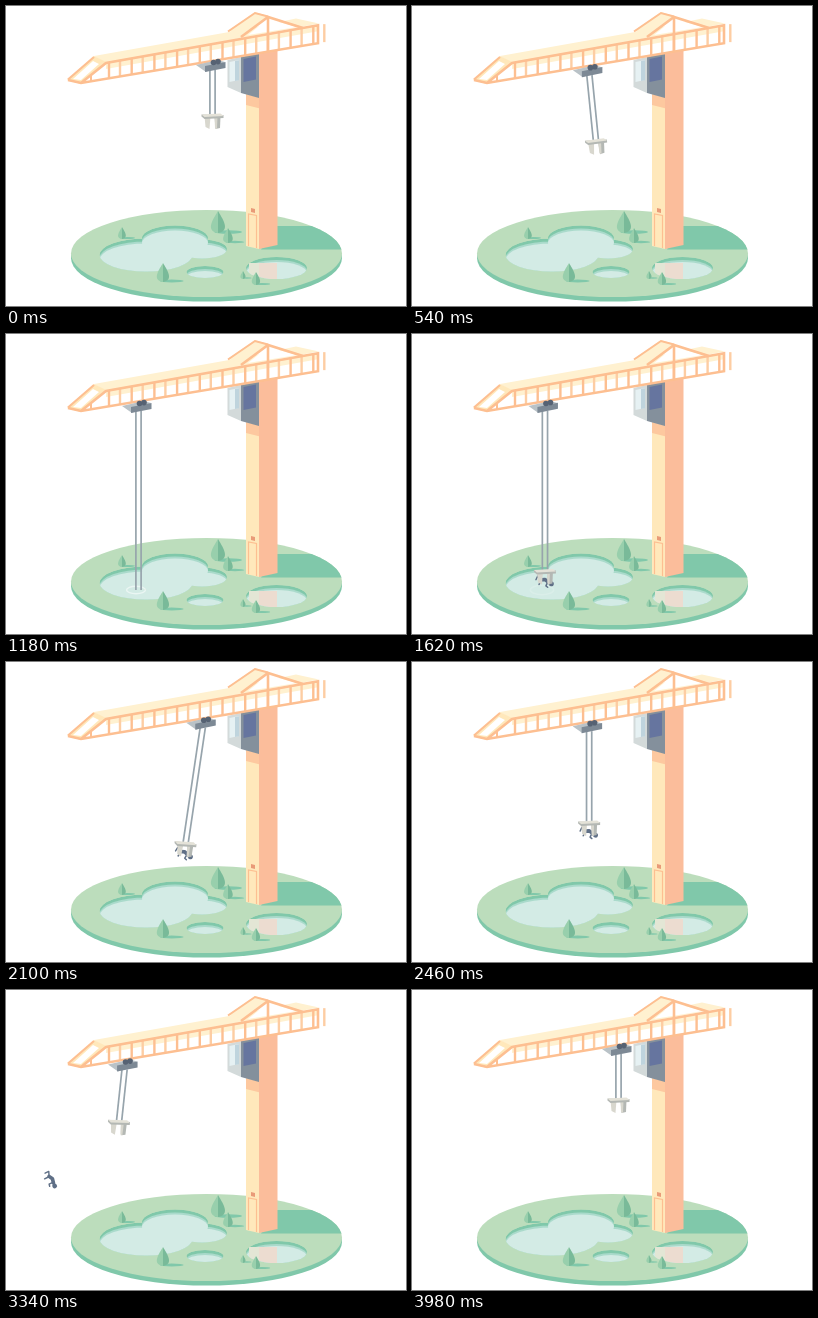
Write an HTML page with a canvas that moves like this. It is 400 px wide and 300 px high and loops after 4680 ms.

```html
<!DOCTYPE html>
<html lang="en">
<head>
<meta charset="utf-8">
<title>Crane</title>
<style>
  html, body { margin: 0; width: 100%; height: 100%; overflow: hidden; background: #fff; }
  canvas { display: block; }
</style>
</head>
<body>
<canvas id="stage" width="400" height="300"></canvas>
<script>
const LOOP = 4680, STEP = 40, WATERLINE = 256;
const GRAB = 1290, RELEASE = 3040, VANISH = 3400;
const C = {
  grass: '#bcddbc', leaf: '#80c8aa', tree: '#98cfac', treeDark: '#79ba99', bank: '#aadacb', water: '#d3ebe5',
  cream: '#ffe8bb', pale: '#fff1d0', peach: '#fbbd9b', rail: '#fdbf91',
  steel: '#7d8995', dark: '#566273', light: '#b9c2c7', cable: '#97a4ac',
  claw: '#d8d7ce', clawDark: '#b4b8b4', beast: '#5f6f86'
};
const stage = document.getElementById('stage').getContext('2d');
const scene = Object.assign(document.createElement('canvas'), { width: 400, height: 300 }).getContext('2d');

function poly(g, color, ...p) {
  g.beginPath();
  for (let i = 0; i < p.length; i += 2) g.lineTo(p[i], p[i + 1]);
  g.closePath();
  g.fillStyle = color;
  g.fill();
}
function line(g, color, width, ...p) {
  g.beginPath();
  for (let i = 0; i < p.length; i += 2) g.lineTo(p[i], p[i + 1]);
  g.strokeStyle = color;
  g.lineWidth = width;
  g.stroke();
}
function oval(g, color, x, y, rx, ry = rx) {
  g.beginPath();
  g.ellipse(x, y, rx, ry, 0, 0, 7);
  g.fillStyle = color;
  g.fill();
}
// A box face with upright sides whose top and bottom run along a slope.
function face(g, color, x, y, w, h, slope) {
  poly(g, color, x, y, x + w, y + w * slope, x + w, y + w * slope + h, x, y + h);
}

const progress = (t, from, to) => Math.min(1, Math.max(0, (t - from) / (to - from)));
const pulse = (t, from, to) => Math.sin(Math.PI * progress(t, from, to));
function glide(t, from, to) {
  const s = progress(t, from, to);
  return s * s * (3 - 2 * s);
}

const trolleyShift = t =>
  -74 * (glide(t, 300, 860) - glide(t, 1590, 2250)) - 89 * (glide(t, 2260, 2780) - glide(t, 3300, 3920));

function cableLength(t) {
  const raised = 1 - (1 - progress(t, 1380, 3900)) ** 2;
  return 46 + 140 * (glide(t, 300, 1290) - raised);
}

const swingAngle = t =>
  .1 * pulse(t, 300, 800) - .04 * pulse(t, 780, 1060) - .15 * pulse(t, 1800, 2340) +
  .33 * pulse(t, 2500, 2960) - .31 * pulse(t, 2900, 3260) - .16 * pulse(t, 3160, 3940);

function pond(lobes, reflect = () => {}) {
  const shape = new Path2D();
  for (const [x, y, rx, ry] of lobes) {
    const lobe = new Path2D();
    lobe.ellipse(x, y, rx, ry, 0, 0, 7);
    shape.addPath(lobe);
  }
  scene.save();
  scene.clip(shape);
  for (const [color, drop] of [[C.leaf, 0], [C.bank, 3], [C.water, 2]]) {
    scene.translate(0, drop);
    scene.fillStyle = color;
    scene.fill(shape);
  }
  reflect();
  scene.restore();
}

function tree(x, y, h) {
  const w = h * .42;
  oval(scene, C.leaf, x + w * 1.1, y - 1, w * 1.5, h * .08);
  for (const [side, color] of [[-1, C.tree], [1, C.treeDark]]) {
    scene.beginPath();
    scene.moveTo(x, y - h);
    scene.bezierCurveTo(x + side * w * .4, y - h * .7, x + side * w * 1.5, y - h * .1, x, y);
    scene.fillStyle = color;
    scene.fill();
  }
}

function drawGround() {
  oval(scene, C.leaf, 200.5, 252, 135.5, 43.5);
  scene.save();
  oval(scene, C.grass, 200.5, 247.5, 135.5, 43.5);
  scene.clip();
  poly(scene, C.leaf, 268, 220, 340, 220, 340, 243.5, 255, 243.5);
  scene.restore();
  pond([[140, 249, 46.5, 16.5], [169, 232, 33, 12.5], [196, 243, 25, 9.5]]);
  pond([[199, 266, 18.5, 6]]);
  pond([[270.5, 262, 30.5, 11]], () => {
    face(scene, '#e3e6d5', 243, 252, 10, 20, 0);
    face(scene, '#ecdcd0', 253, 252, 18, 20, 0);
  });
  tree(212, 227, 22);
  tree(116, 233, 12);
  tree(222, 237, 15);
  tree(157, 276, 19);
  tree(237, 273, 8);
  tree(250, 279, 13);
}

function drawTower() {
  poly(scene, C.cream, 240, 50, 253, 47, 253, 243, 240, 240);
  poly(scene, C.peach, 253, 42, 271.5, 40, 271.5, 239, 253, 243);
  face(scene, '#fdc89f', 240, 88, 13, 11, .25);
  line(scene, C.rail, 1.2, 242.5, 240, 242.5, 208, 250.5, 209.5, 250.5, 242);
  face(scene, '#e99b78', 245, 202, 4, 4, .25);
  poly(scene, '#d3dada', 221.5, 54, 235, 51, 235, 87, 221.5, 81);
  face(scene, '#e6f1f3', 223.5, 56, 9.5, 20, -.2);
  face(scene, '#bfd4dd', 229, 55, 4, 20, -.2);
  poly(scene, '#84909c', 235, 51, 253, 47, 253, 92, 235, 87);
  face(scene, '#66759f', 237.5, 53, 12.5, 23, -.2);
}

function drawBeam() {
  const top = x => 57 - .178 * (x - 100), bottom = x => 77 - .168 * (x - 75);
  poly(scene, C.pale, 88, 50, 240, 23, 290, 12.5, 313, 17.5, 100, 57);
  poly(scene, '#fff', 100, top(100), 312, top(312), 312, bottom(312), 75, 77);
  poly(scene, C.pale, 100, top(100), 312, top(312), 312, top(312) + 6, 100, top(100) + 6);
  poly(scene, C.cream, 61, 74, 88, 50, 100, 56, 75, 78);
  poly(scene, '#fff', 67, 73, 87, 55, 93, 58, 75, 74);
  poly(scene, C.pale, 222, 25, 249, 6, 262, 10, 236, 29);
  poly(scene, '#fff', 242, 29, 262, 13, 291, 21);
  line(scene, C.rail, 2, 222, 25.5, 249, 7, 262, 10.5);
  for (let x = 103; x < 312; x += 22.7) {
    line(scene, C.rail, 2.4, x, top(x), x, bottom(x));
    line(scene, '#fdcda3', 2.4, x + 11, top(x + 11), x + 11, bottom(x + 11));
  }
  line(scene, C.rail, 2.2, 62, 73.5, 88, 51);
  line(scene, C.rail, 2.6, 62, 74, 75, 77, 312, bottom(312), 312, top(312), 100, 57, 75, 77);
  line(scene, C.rail, 2, 85, 68, 85, 75);
  line(scene, C.rail, 2.6, 235, 31, 262, 11, 297, 22);
  line(scene, C.rail, 2.6, 262, 10, 262, 45);
}

function drawBeast(x, y, angle) {
  stage.save();
  stage.translate(x, y);
  stage.rotate(angle);
  stage.lineCap = stage.lineJoin = 'round';
  line(stage, C.beast, 3.6, -4, 0, 0, -1, 4, 1);
  oval(stage, C.beast, 7, 2, 2.4);
  line(stage, C.beast, 1.4, -4, 0, -8, -3, -9, 1);
  line(stage, C.beast, 1.5, -4, 1, -5, 5);
  line(stage, C.beast, 1.5, 3, 1, 2, 5, 4, 6);
  stage.restore();
}

function drawClaw(x, y, angle, loaded) {
  stage.save();
  stage.translate(x, y);
  stage.rotate(angle);
  if (loaded) drawBeast(0, 9, .2);
  poly(stage, C.clawDark, 2, 0, 8, 0, 7.5, 12, 3, 13);
  poly(stage, C.claw, -8, 0, -2, 0, -3, 13, -7, 11);
  poly(stage, C.claw, 2, 0, 5, 0, 4.5, 13, 2.5, 12);
  poly(stage, C.clawDark, -11, -1.5, 11, -1, 11, 2, -8, 3, -11, .5);
  poly(stage, '#e4e2d8', -11, -1.5, 8, -2.5, 11, 0, -8, 1);
  stage.restore();
}

function drawTrolley(shift, drop) {
  stage.save();
  stage.translate(shift, drop);
  poly(stage, C.light, 190, 59, 212, 54, 219, 56, 200, 66);
  face(stage, C.steel, 199, 60, 20.5, 6, -.2);
  oval(stage, C.dark, 207.5, 56.5, 2.8);
  oval(stage, C.dark, 212, 55.6, 2.8);
  stage.restore();
}

function drawRig(t) {
  const shift = trolleyShift(t), drop = -.176 * shift;
  const length = cableLength(t), swing = swingAngle(t);
  const x = 206.5 + shift, y = 64 + drop;
  const endX = x + length * Math.sin(swing), endY = y + length * Math.cos(swing);
  stage.save();
  stage.beginPath();
  stage.rect(0, 0, 400, WATERLINE);
  stage.clip();
  for (const dx of [-2.6, 2.6]) line(stage, C.cable, 1.7, x + dx, y, endX + dx, endY);
  drawClaw(endX, endY, -swing * .8, t >= GRAB && t < RELEASE);
  drawTrolley(shift, drop);
  stage.restore();
}

function drawRipple(t, from, to, size) {
  const s = progress(t, from, to);
  stage.beginPath();
  stage.ellipse(130, WATERLINE, size * s, size * .4 * s, 0, 0, 7);
  stage.strokeStyle = `rgba(255,255,255,${1 - s})`;
  stage.lineWidth = 1.5;
  if (s > 0) stage.stroke();
}

function draw(now) {
  const t = Math.floor((now % LOOP - 20) / STEP) * STEP + 20;
  stage.drawImage(scene.canvas, 0, 0);
  drawRipple(t, 1020, 1360, 20);
  drawRipple(t, 1420, 1660, 14);
  drawRig(t);
  if (t >= RELEASE && t < VANISH) {
    const flight = t - RELEASE;
    drawBeast(45 + 48 * (1 - flight / 340) ** 2, 157 + .00036 * flight ** 2, .2 + flight / 450);
  }
}

scene.fillStyle = '#fff';
scene.fillRect(0, 0, 400, 300);
drawGround();
drawTower();
drawBeam();

const start = performance.now();
function tick() {
  draw(performance.now() - start);
  requestAnimationFrame(tick);
}
tick();
</script>
</body>
</html>
```
